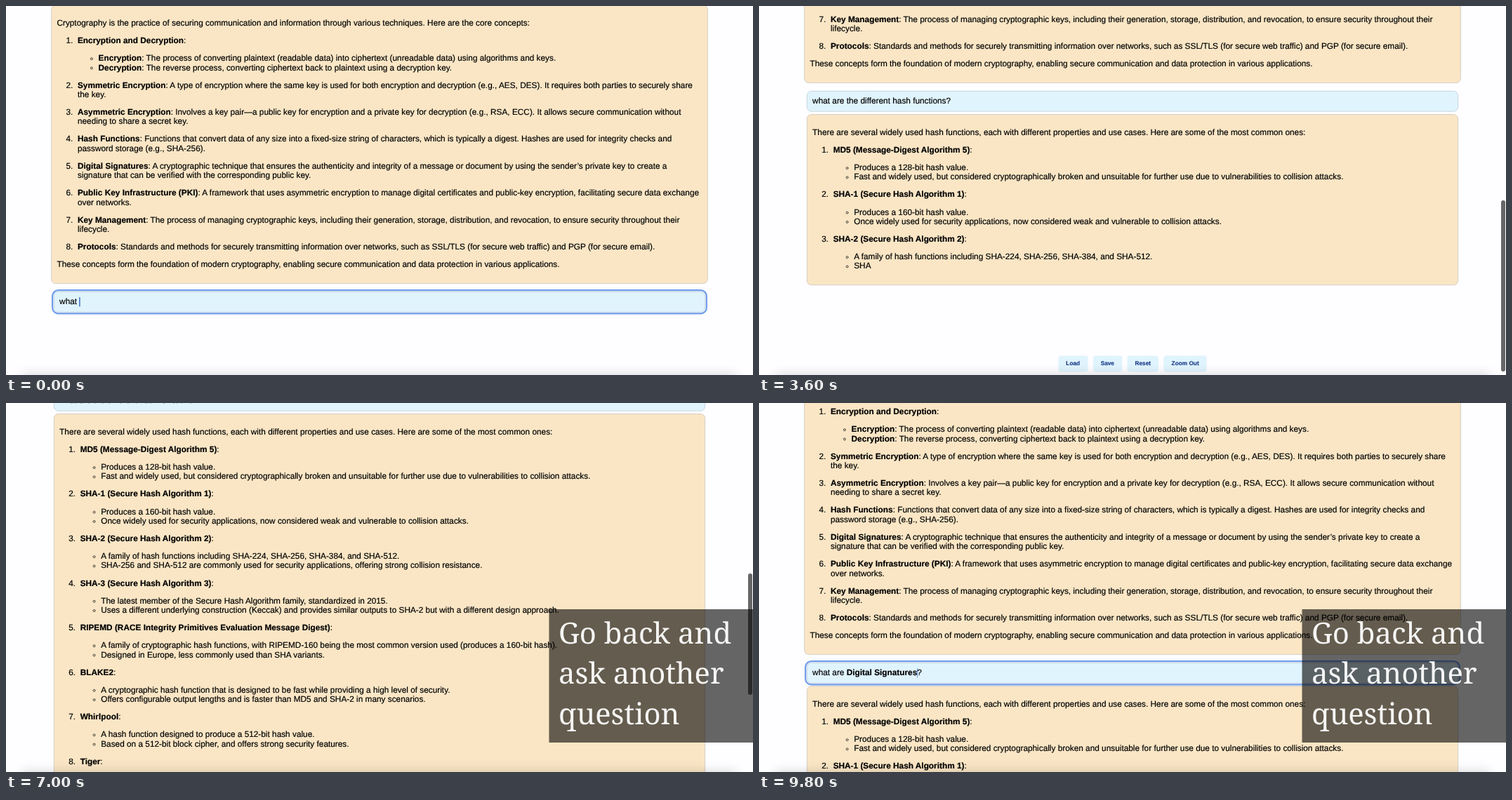
Write an HTML page that moves like this. It is 1064 px wide and 526 px high and loops after 10000 ms.

```html
<!DOCTYPE html>
<html lang="en">
<head>
<meta charset="utf-8">
<title>Chat about hash functions</title>
<style>
html, body { margin: 0; width: 100%; height: 100%; overflow: hidden; background: #fefdff; }
#stage { position: relative; width: 1064px; height: 526px; overflow: hidden; }
#page {
  position: absolute; left: 0; top: 0; width: 1440px; transform-origin: 0 0;
  font: 16px/18px "Liberation Sans", Arial, sans-serif; color: #000;
  -webkit-text-stroke: .25px;
  text-rendering: geometricPrecision; white-space: nowrap;
  display: flow-root;
}
.card, #ask { box-sizing: border-box; border: 1px solid #c8c4be; border-radius: 9px; padding: 10px; display: flow-root; }
.card { background: #fae6c5; margin: 0 92px; }
#intro { margin: 0 87px; }
#ask { position: relative; height: 40px; margin: 15px 92px 5px; background: #e0f4fd; border-color: #b9c9d4; white-space: pre; }
#ask.focus { outline: 3px solid #6f9cea; outline-offset: 1px; }
p, ol, ul { margin: 16px 0; }
ol, ul { padding: 0 0 0 40px; }
ol > li::marker { content: counter(list-item) ".\A0\A0"; }
ul { list-style: circle; }
[hidden] { display: none; }
#caret { position: relative; }
#caret::after { content: ""; position: absolute; left: 0; top: 0; width: 1.6px; height: 18px; background: #3c6fc4; }
#buttons { display: flex; justify-content: center; gap: 10px; margin-top: 136px; padding-bottom: 7px; }
#buttons span {
  height: 31px; line-height: 31px; padding: 0 15px; border-radius: 5px;
  background: #e0f4fd; color: #1d3f8c; font-size: 11.2px; font-weight: bold;
}
#thumb { position: absolute; left: 1057px; width: 6px; border-radius: 3px; background: #666; }
#shade { position: absolute; left: 24px; right: 24px; top: 527px; height: 20px; box-shadow: 0 0 18px rgba(0,0,0,.19); }
#note { position: absolute; left: 0; top: 0; }
#note text { font: 41.8px "Noto Serif", "Liberation Serif", serif; fill: #fff; fill-opacity: .94; text-rendering: geometricPrecision; }
</style>
</head>
<body>
<div id="stage">
  <div id="page">
    <div class="card" id="intro"></div>
    <div id="ask"></div>
    <div class="card" id="answer"></div>
    <div id="buttons"><span>Load</span><span>Save</span><span>Reset</span><span>Zoom Out</span></div>
  </div>
  <div id="shade"></div>
  <div id="thumb"></div>
  <svg id="note" width="1064" height="526">
    <rect x="773.5" y="294" width="290.5" height="190"/>
    <text x="787" y="342.5">Go back and</text>
    <text x="787" y="400.2">ask another</text>
    <text x="787" y="457.9">question</text>
  </svg>
</div>
<script>
const $ = id => document.getElementById(id);
const LOOP = 10000, TICK = 200, SCALE = 1064 / 1440, VIEW = 526;
const TOP = -1.6;      // first card's edge in the opening view
const ABOVE = 307;     // page height scrolled away above that view
const ANSWER_TOP = 442;

const para = s => `<p>${s}</p>`;
const bullets = list => list.length ? `<ul>${list.map(s => `<li>${s}</li>`).join('')}</ul>` : '';
const item = ([title, text, ...list]) =>
  `<li>${para(`<b>${title}</b>:${text && ' ' + text}`)}${bullets(list)}</li>`;
const numbered = items => `<ol>${items.map(item).join('')}</ol>`;

$('intro').innerHTML =
  para('Cryptography is the practice of securing communication and information through various techniques. Here are the core concepts:') +
  numbered([
    ['Encryption and Decryption', '',
      '<b>Encryption</b>: The process of converting plaintext (readable data) into ciphertext (unreadable data) using algorithms and keys.',
      '<b>Decryption</b>: The reverse process, converting ciphertext back to plaintext using a decryption key.'],
    ['Symmetric Encryption', 'A type of encryption where the same key is used for both encryption and decryption (e.g., AES, DES). It requires both parties to securely share<br>the key.'],
    ['Asymmetric Encryption', 'Involves a key pair—a public key for encryption and a private key for decryption (e.g., RSA, ECC). It allows secure communication without<br>needing to share a secret key.'],
    ['Hash Functions', 'Functions that convert data of any size into a fixed-size string of characters, which is typically a digest. Hashes are used for integrity checks and<br>password storage (e.g., SHA-256).'],
    ['Digital Signatures', 'A cryptographic technique that ensures the authenticity and integrity of a message or document by using the sender’s private key to create a<br>signature that can be verified with the corresponding public key.'],
    ['Public Key Infrastructure (PKI)', 'A framework that uses asymmetric encryption to manage digital certificates and public-key encryption, facilitating secure data exchange<br>over networks.'],
    ['Key Management', 'The process of managing cryptographic keys, including their generation, storage, distribution, and revocation, to ensure security throughout their<br>lifecycle.'],
    ['Protocols', 'Standards and methods for securely transmitting information over networks, such as SSL/TLS (for secure web traffic) and PGP (for secure email).']
  ]) +
  para('These concepts form the foundation of modern cryptography, enabling secure communication and data protection in various applications.');

$('answer').innerHTML =
  para('There are several widely used hash functions, each with different properties and use cases. Here are some of the most common ones:') +
  numbered([
    ['MD5 (Message-Digest Algorithm 5)', '',
      'Produces a 128-bit hash value.',
      'Fast and widely used, but considered cryptographically broken and unsuitable for further use due to vulnerabilities to collision attacks.'],
    ['SHA-1 (Secure Hash Algorithm 1)', '',
      'Produces a 160-bit hash value.',
      'Once widely used for security applications, now considered weak and vulnerable to collision attacks.'],
    ['SHA-2 (Secure Hash Algorithm 2)', '',
      'A family of hash functions including SHA-224, SHA-256, SHA-384, and SHA-512.',
      'SHA-256 and SHA-512 are commonly used for security applications, offering strong collision resistance.'],
    ['SHA-3 (Secure Hash Algorithm 3)', '',
      'The latest member of the Secure Hash Algorithm family, standardized in 2015.',
      'Uses a different underlying construction (Keccak) and provides similar outputs to SHA-2 but with a different design approach.'],
    ['RIPEMD (RACE Integrity Primitives Evaluation Message Digest)', '',
      'A family of cryptographic hash functions, with RIPEMD-160 being the most common version used (produces a 160-bit hash).',
      'Designed in Europe, less commonly used than SHA variants.'],
    ['BLAKE2', '',
      'A cryptographic hash function that is designed to be fast while providing a high level of security.',
      'Offers configurable output lengths and is faster than MD5 and SHA-2 in many scenarios.'],
    ['Whirlpool', '',
      'A hash function designed to produce a 512-bit hash value.',
      'Based on a 512-bit block cipher, and offers strong security features.'],
    ['Tiger', '',
      'A fast hash function designed for 64-bit platforms, produces a 192-bit hash value.']
  ]);

// Index the answer so that any number of its characters can be shown.
const full = $('answer').textContent;
const parts = [], blocks = [];
const walker = document.createTreeWalker($('answer'), NodeFilter.SHOW_TEXT);
for (let pos = 0; walker.nextNode();) {
  const node = walker.currentNode;
  parts.push({ node, text: node.data, start: pos });
  pos += node.data.length;
}
for (const el of $('answer').querySelectorAll('p, li'))
  blocks.push({ el, start: parts.find(p => el.contains(p.node)).start });

const after = (find, length) => full.indexOf(find) + length;
const STREAM = [
  [3000, 0],
  [3600, after('SHA-256 and SHA-512 are', 3)],
  [4400, after('designed to produce', 11)],
  [5000, full.length + 420]
];
const SCROLL_BACK = [[6800, 442], [7000, 425], [7200, 370], [7400, 250], [7600, 128], [7800, 70], [8000, 45], [8200, 37]];
const THUMB = [[2800, 0], [3000, 1], [4000, 1], [4200, .6], [4400, .08], [4600, 0],
  [6800, 0], [7000, 1], [8400, 1], [8600, .6], [8800, 0]];

function at(table, t) {
  if (t <= table[0][0]) return table[0][1];
  for (let i = 1; i < table.length; i++) {
    const [t0, a] = table[i - 1], [t1, b] = table[i];
    if (t <= t1) return a + (b - a) * (t - t0) / (t1 - t0);
  }
  return table[table.length - 1][1];
}

function showAnswer(t) {
  const n = Math.round(at(STREAM, t));
  $('answer').hidden = t < 2800;
  for (const p of parts) p.node.data = p.text.slice(0, Math.max(0, n - p.start));
  for (const b of blocks) b.el.hidden = n <= b.start;
  // The rest of the answer grows below the view.
  const rest = Math.min(208, Math.max(0, n - full.length) * .5);
  $('answer').style.paddingBottom = 10 + rest + 'px';
}

function showQuestion(t) {
  const caret = '<span id="caret"></span>';
  const question = 'what are the different hash functions?';
  let html = question;
  if (t < 2600) html = question.slice(0, Math.round(5 + 33 * Math.min(1, t / 2000))) + caret;
  else if (t >= 9600) html = `what are <b>Digital Signatures</b>${caret}?`;
  else if (t >= 9400) html = `what are ${caret}?`;
  $('ask').innerHTML = html;
  $('ask').className = t < 2800 || t >= 9200 ? 'focus' : '';
}

function showScroll(t) {
  const height = $('page').offsetHeight * SCALE + TOP;
  let y = 0;
  if (t >= 2800) y = Math.min(ANSWER_TOP, Math.floor(height - VIEW));
  if (t >= 6800) y = Math.round(at(SCROLL_BACK, t));
  $('page').style.transform = `translateY(${TOP - y}px) scale(${SCALE})`;
  const track = 519 / (height + ABOVE), thumb = $('thumb').style;
  thumb.top = 2 + track * (ABOVE + y) + 'px';
  thumb.height = track * VIEW + 'px';
  thumb.opacity = at(THUMB, t);
}

function showNote(t) {
  $('note').style.display = t < 6000 ? 'none' : 'block';
  $('note').querySelector('rect').style.fillOpacity = t < 6200 ? .44 : .6;
}

let last = -1;
const begin = performance.now();
function draw() {
  const t = Math.floor((performance.now() - begin) % LOOP / TICK) * TICK;
  if (t !== last) {
    last = t;
    showAnswer(t);
    showQuestion(t);
    showScroll(t);
    showNote(t);
  }
  requestAnimationFrame(draw);
}
draw();
</script>
</body>
</html>
```
